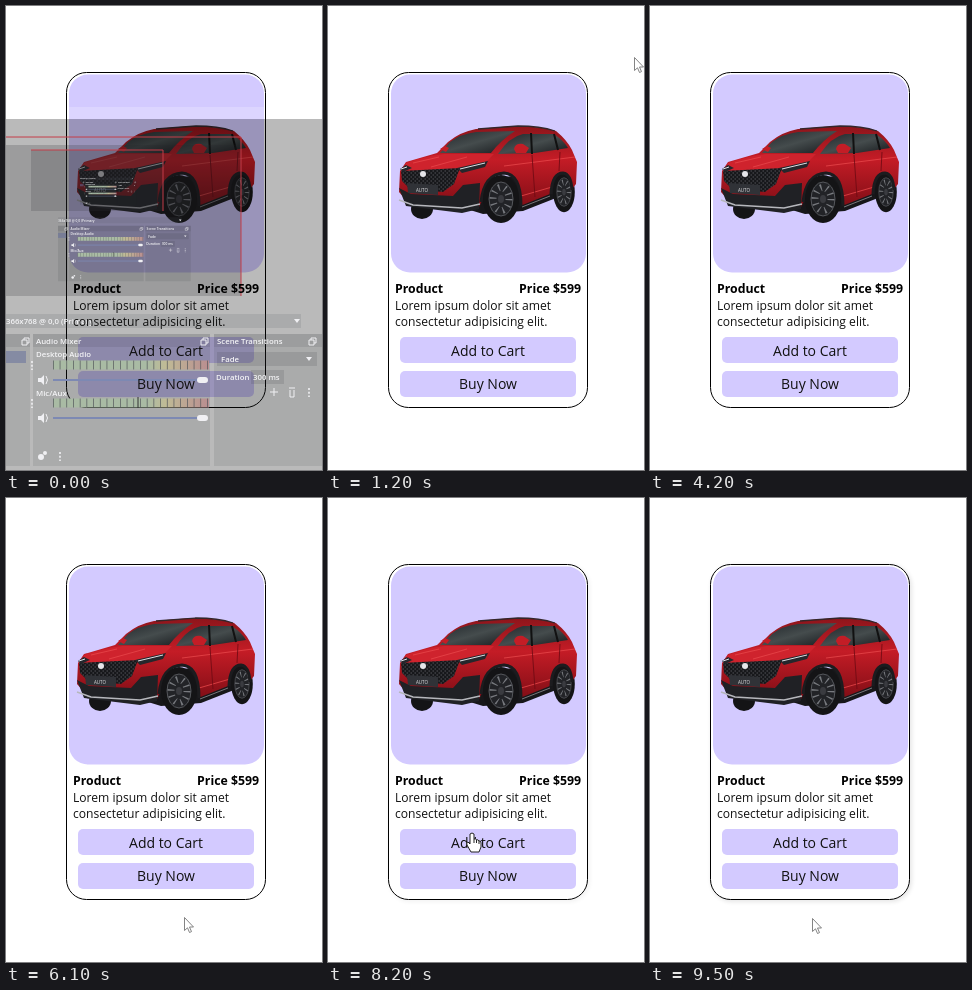
Write an HTML page that moves like this. It is 316x464 px and loops after 9.6 s.

```html
<!DOCTYPE html>
<html lang="en">
<head>
<meta charset="utf-8">
<title>Product card</title>
<style>
html, body { margin: 0; width: 100%; height: 100%; overflow: hidden; background: #fff; }
svg { display: block; width: 316px; height: 464px; }
text { font: 12.1px "Open Sans", "Noto Sans", sans-serif; fill: #111; }
.bold { font-size: 12.3px; font-weight: 700; fill: #000; }
.button { font-size: 14px; text-anchor: middle; }
#recorder text { font-size: 7.8px; font-weight: 600; fill: #f4f4f6; }
</style>
</head>
<body>
<svg viewBox="0 0 316 464">
  <defs>
    <filter id="blur" x="-10%" y="-10%" width="120%" height="120%"><feGaussianBlur stdDeviation="2"/></filter>
    <linearGradient id="paint" x1="0" y1="0" x2="0" y2="1">
      <stop offset="0" stop-color="#8d151b"/><stop offset=".4" stop-color="#c41c26"/><stop offset="1" stop-color="#7d0d15"/>
    </linearGradient>
    <linearGradient id="glass" x1="0" y1="0" x2="1" y2="1">
      <stop offset="0" stop-color="#20262a"/><stop offset=".5" stop-color="#454c4d"/><stop offset="1" stop-color="#16191c"/>
    </linearGradient>
    <linearGradient id="meter" gradientUnits="userSpaceOnUse" x1="47" x2="203">
      <stop offset=".6" stop-color="#a9bba4"/><stop offset=".72" stop-color="#c0bb96"/><stop offset="1" stop-color="#b98d90"/>
    </linearGradient>
    <pattern id="mesh" width="4" height="4" patternUnits="userSpaceOnUse">
      <path d="M0 0H4V4H0Z" fill="#17181b"/><path d="M.5 1H2M2.5 3H4" stroke="#77797e" stroke-width=".6"/>
    </pattern>
    <g id="wheel">
      <ellipse rx="18" ry="24" fill="#141416"/>
      <ellipse rx="12" ry="17" fill="#222327" stroke="#55575c"/>
      <ellipse rx="8" ry="11.500" fill="none" stroke="#77797e" stroke-width="7" stroke-dasharray="1.300 4.900"/>
      <ellipse rx="3" ry="4" fill="#3a3b40"/>
    </g>
    <g id="popout"><path d="M0 2H5V7H0ZM2 2V0H7V5H5" fill="none" stroke="#f0f0f3"/></g>
    <g id="channel">
      <path d="M47 0H203" stroke="url(#meter)" stroke-width="9"/>
      <path d="M47 0H203" stroke="#55585c" stroke-width="9" stroke-dasharray=".7 6"/>
      <path d="M47 15H197" stroke="#7d89b3" stroke-width="2"/>
      <rect x="191" y="12" width="11" height="6" rx="3" fill="#f0f0f3"/>
      <path d="M32 13H35L38 10V20L35 17H32Z" fill="#f0f0f3"/>
      <path d="M40 11Q43 15 40 19" fill="none" stroke="#f0f0f3"/>
      <path d="M26-4V5" stroke="#f0f0f3" stroke-width="1.600" stroke-dasharray="2 1.800"/>
    </g>
  </defs>

  <rect id="shadow" x="61" y="67" width="201" height="337" rx="21" filter="url(#blur)"/>
  <rect x="60.500" y="66.500" width="199" height="335" rx="20" fill="#fff" stroke="#000"/>
  <g fill="#d3caff">
    <rect x="63" y="68.500" width="195" height="198" rx="19"/>
    <rect x="72" y="331" width="176" height="26" rx="5"/>
    <rect x="72" y="365" width="176" height="26" rx="5"/>
  </g>

  <g id="car">
    <ellipse cx="94" cy="203" rx="11" ry="10" fill="#141416"/>
    <path d="M80 185 155 208 195 205 228 192 244 184 240 165 100 178Z" fill="#17171a"/>
    <use href="#wheel" transform="translate(236 186) scale(.6 .84)"/>
    <path d="M72 165 78 156 109 147 120 136Q132 126 148 123L185 120Q211 120 228 125 239 134 244 144L249 156 248 178 244 183Q243 165 234 166 225 167 222 188L192 200Q193 170 177 168 158 167 154 195L150 203 78 194 71 186Z" fill="url(#paint)"/>
    <path d="M78 157Q99 150 116 148L166 148 159 155 130 163 76 165Z" fill="#cf232d"/>
    <path d="M85 157 111 151M103 161 139 151M176 160 247 151M193 190 224 181" stroke="#e8474b" stroke-width=".8"/>
    <path d="M112 147 122 136Q132 128 148 126L187 125Q173 134 163 147Z" fill="url(#glass)"/>
    <path d="M170 148Q181 131 195 128L226 128Q236 135 240 142L207 147Z" fill="url(#glass)"/>
    <path d="M203 127 204 148M226 128 230 144" stroke="#111" stroke-width="2"/>
    <path d="M150 123 190 120Q212 120 227 125" fill="none" stroke="#33262a" stroke-width="1.300"/>
    <path d="M186 143Q187 137 195 138L201 142 198 147H188ZM112 143 117 140 121 142 118 146Z" fill="#c31d26"/>
    <path d="M204 149 207 191M232 146 231 165" stroke="#6b0a12" stroke-width=".8"/>
    <path d="M153 196Q156 168 176 167 193 168 193 200M223 188Q224 167 235 167 243 168 244 184" fill="none" stroke="#1c1c1f" stroke-width="3"/>
    <path d="M194 201 222 190" stroke="#77777c"/>
    <use href="#wheel" transform="translate(173 193)"/>
    <path d="M73 165 132 162 126 178 115 186 82 183 74 175Z" fill="url(#mesh)"/>
    <path d="M129 162 160 155 157 161 134 167ZM72 163 78 159 84 162 75 166Z" fill="#25272c"/>
    <path d="M132 163 157 157M73 163 79 161M139 187 149 185" stroke="#dfe0e6"/>
    <path d="M71 182 83 188 125 190 135 179 152 177 151 203 134 207 78 200Z" fill="#202125"/>
    <path d="M71 194 85 199 134 202 152 198" fill="none" stroke="#b6b7bc" stroke-width="1.600"/>
    <path d="M79 177 110 179V189L80 187Z" fill="#303237"/>
    <text x="88" y="185.500" style="font-size:4.500px;fill:#e5e5e8">AUTO</text>
    <circle cx="95" cy="168" r="3" fill="#e6e6ea"/>
  </g>

  <g id="recorder">
    <path d="M63 101H258V113H63Z" fill="#fff" opacity=".2"/>
    <path d="M0 113H316V464H0Z" opacity=".27"/>
    <path d="M0 139H235V290H0Z" fill="#25262c" opacity=".2"/>
    <path d="M25 144H157V205H25Z" fill="#33343a" opacity=".2"/>
    <path d="M0 131H235V290M25 144H157V205" fill="none" stroke="#c43c48"/>
    <g id="docks">
      <path d="M0 308H295V322H0Z" fill="#55565c" opacity=".15"/>
      <path d="M0 328H24V460H0ZM27 328H204V460H27ZM208 328H316V460H208Z" fill="#25262d" opacity=".1"/>
      <path d="M0 328H24V341H0ZM27 328H204V341H27ZM208 328H316V341H208Z" fill="#222329" opacity=".1"/>
      <path d="M0 345H20V357H0Z" fill="#626c9c" opacity=".5"/>
      <path d="M211 346H311V360H211ZM245 364H278V378H245Z" fill="#33343b" opacity=".14"/>
      <use href="#channel" y="359"/><use href="#channel" y="397"/>
      <use href="#popout" x="16" y="332"/><use href="#popout" x="195" y="332"/><use href="#popout" x="303" y="332"/>
      <path d="M132 391V402" stroke="#333"/>
      <g fill="#f0f0f3">
        <path d="M288 313H294L291 317ZM300 351H306L303 355Z"/>
        <circle cx="35" cy="451" r="3"/><circle cx="39" cy="447" r="2"/>
      </g>
      <g fill="none" stroke="#f0f0f3">
        <path d="M264 386H272M268 382V390M283 382H289M284 384V391H288V384"/>
        <path d="M54 446V455M303 382V391" stroke-width="1.600" stroke-dasharray="2 1.800"/>
      </g>
      <text x="0" y="318">366x768 @ 0,0 (Primary</text>
      <text x="30" y="338">Audio Mixer</text><text x="30" y="351">Desktop Audio</text><text x="30" y="390">Mic/Aux</text>
      <text x="211" y="338">Scene Transitions</text><text x="215" y="356">Fade</text>
      <text x="210" y="374">Duration</text><text x="247" y="374">300 ms</text>
    </g>
    <use href="#docks" transform="translate(52 82) scale(.42)"/>
    <use href="#docks" transform="translate(74 116) scale(.18)"/>
  </g>

  <text class="bold" x="67" y="287">Product</text>
  <text class="bold" x="253" y="287" text-anchor="end">Price $599</text>
  <text x="67" y="304">Lorem ipsum dolor sit amet</text>
  <text x="67" y="320">consectetur adipisicing elit.</text>
  <text class="button" x="160" y="350">Add to Cart</text>
  <text class="button" x="160" y="383">Buy Now</text>

  <g id="pointer" fill="#fff" stroke-linejoin="round">
    <path id="arrow" d="M.5.5V13.500L3.500 10.800 5.500 15.500 7.500 14.600 5.500 10H9.500Z" stroke="#777" stroke-width=".9"/>
    <path id="hand" d="M-2 1Q0-1 2 1V6Q4 5 4.500 7 6 6 7 8 9 7 9 10V14L7 19H-1L-5 12Q-6 9-4 9L-2 11Z M2 6V10M4.500 7V10M7 8V11" stroke="#222"/>
  </g>
</svg>
<script>
const LOOP = 9600, STEP = 100, HOVER_FROM = 6000;
const $ = id => document.getElementById(id);
const show = (el, on) => el.style.display = on ? "" : "none";
const clamp = v => Math.min(1, Math.max(0, v));
const ease = u => u * u * (3 - 2 * u);
const mix = (a, b, u) => a + (b - a) * u;

// Eased hops between evenly timed points.
const hops = (start, end, ...points) => ({
  start, end,
  at(u) {
    const i = Math.floor(u * (points.length - 1));
    const k = ease(u * (points.length - 1) - i);
    const [a, b] = [points[i], points[i + 1]];
    return [mix(a[0], b[0], k), mix(a[1], b[1], k)];
  }
});

// Up into the card and back down below it.
const swoop = (start, end, x0, x1, y, rise) => ({
  start, end,
  at: u => [mix(x0, x1, ease(u)), y - rise * Math.sin(Math.PI * u) ** 2]
});

const moves = [
  hops(500, 900, [306, 190], [298, 70]),
  hops(1200, 1400, [306, 51], [247, 24]),
  hops(2100, 2900, [262, 16], [82, 52], [-20, 320]),
  hops(3000, 4200, [8, 144], [22, 190], [14, 232], [178, 368], [178, 368]),
  hops(4300, 5600, [5, 194], [186, 430], [142, 284], [177, 424]),
  hops(5900, 6000, [177, 424], [177, 424]),
  swoop(6000, 7900, 178, 140, 424, 185),
  swoop(7900, 8900, 140, 160, 442, 163),
  swoop(8900, LOOP, 160, 162, 442, 117)
];

function pointerAt(t) {
  const move = moves.find(m => t >= m.start && t < m.end);
  return move && move.at((t - move.start) / (move.end - move.start));
}

const inside = (p, x, y, w, h) => p[0] >= x && p[0] <= x + w && p[1] >= y && p[1] <= y + h;

// The card shadow rises while hovered and falls afterwards.
function shadowAt(t) {
  let level = 0;
  for (let s = HOVER_FROM; s <= t; s += STEP)
    level = clamp(level + (inside(pointerAt(s), 60, 66, 200, 336) ? .15 : -.25));
  return level;
}

function draw(now) {
  const t = Math.floor(now % LOOP / STEP) * STEP;
  const p = pointerAt(t);
  show($("recorder"), t < STEP);
  $("shadow").setAttribute("opacity", shadowAt(t) * .16);
  show($("pointer"), p);
  if (!p) return;
  const onButton = inside(p, 72, 331, 176, 26) || inside(p, 72, 365, 176, 26);
  show($("arrow"), !onButton);
  show($("hand"), onButton);
  $("pointer").setAttribute("transform", `translate(${p.map(Math.round)})`);
}

const start = performance.now();
function tick() {
  draw(performance.now() - start);
  requestAnimationFrame(tick);
}
tick();
</script>
</body>
</html>
```
